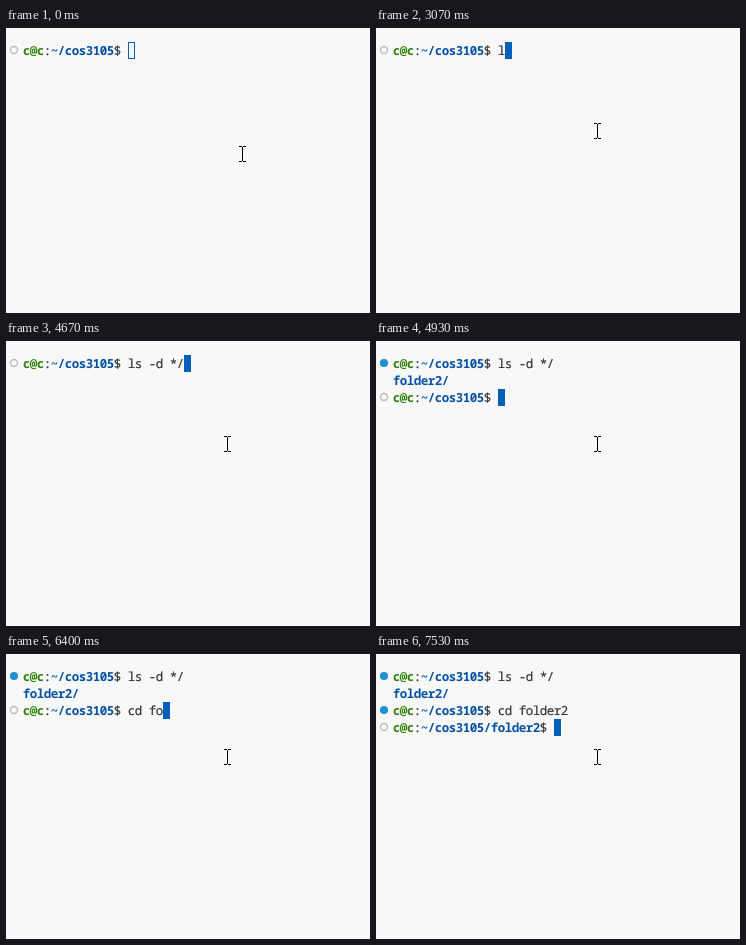
Recreate the animation shown at these times as an HTML page. Size 364x285 px, loop 8000 ms.

```html
<!DOCTYPE html>
<html lang="en">
<head>
<meta charset="utf-8">
<title>Terminal</title>
<style>
  html, body { margin: 0; width: 100%; height: 100%; overflow: hidden; background: #f8f8f8; }
  svg { display: block; width: 364px; height: 285px; }
  text {
    font: 12.5px "Noto Sans Mono", "DejaVu Sans Mono", monospace;
    fill: #333; stroke: #333; stroke-width: .2;
    text-anchor: middle; text-rendering: geometricPrecision; white-space: pre;
  }
  .user, .path { font-weight: 600; stroke: none; }
  .user { fill: #2f800a; }
  .path { fill: #0451a5; }
  .done { fill: #2090d3; }
  .open { fill: none; stroke: #bdbdbd; stroke-width: 1.4; }
</style>
</head>
<body>
<svg viewBox="0 0 364 285">
  <g id="screen"></g>
  <rect id="caret" stroke="#005fb8"/>
  <path id="beam" fill="none" stroke="#000" shape-rendering="crispEdges"
        d="M0 .5h3m1 0h3M3.5 1v14M0 15.5h3m1 0h3"/>
</svg>
<script>
const LOOP = 8000, LEFT = 17, TOP = 14, CELL = 7, ROW = 17;
const RUN_LS = 4870, LS_DONE = 4930, RUN_CD = 7530, FOCUS = 130;

const ls = { text: 'ls -d */', at: [3070, 3200, 3330, 3600, 3730, 3930, 4330, 4670] };
const cd = { text: 'cd folder2', at: [5730, 5930, 6130, 6330, 6400, 6670, 6730, 7000, 7070, 7330] };

// time, x, y
const pointer = [
  [0, 233, 118], [70, 229, 113], [130, 222, 103], [200, 218, 98],
  [400, 218, 97], [470, 218, 96], [530, 218, 95]
];

const screen = document.getElementById('screen');
const caret = document.getElementById('caret');
const beam = document.getElementById('beam');

const typed = (cmd, t) => cmd.text.slice(0, cmd.at.filter(at => at <= t).length);

// Centres each character in its terminal cell.
function put(text, col, row, cls = '') {
  const xs = [...text].map((_, i) => LEFT + CELL * (col + i + .5)).join(' ');
  return `<text class="${cls}" x="${xs}" y="${TOP + ROW * row + 13}">${text}</text>`;
}

function prompt(path, cmd, row, done) {
  const end = 4 + path.length;
  const dot = `<circle class="${done ? 'done' : 'open'}" cx="8" cy="${TOP + ROW * row + 8}" r="${done ? 4.1 : 3.5}"/>`;
  const svg = dot + put('c@c', 0, row, 'user') + put(':', 3, row) +
    put(path, 4, row, 'path') + put('$', end, row) + (cmd ? put(cmd, end + 2, row) : '');
  return { svg, col: end + 2 + cmd.length, row };
}

function content(t) {
  const home = '~/cos3105';
  const first = prompt(home, typed(ls, t), 0, t >= LS_DONE);
  if (t < RUN_LS) return first;
  if (t < LS_DONE) return { svg: first.svg, col: 0, row: 1 };

  const listing = first.svg + put('folder2/', 0, 1, 'path');
  const second = prompt(home, typed(cd, t), 2, t >= RUN_CD);
  if (t < RUN_CD) return { ...second, svg: listing + second.svg };

  const third = prompt(home + '/folder2', '', 3, false);
  return { ...third, svg: listing + second.svg + third.svg };
}

let shown = '';
function draw(t) {
  const { svg, col, row } = content(t);
  if (svg !== shown) screen.innerHTML = shown = svg;

  const box = {
    x: LEFT + CELL * col + .5, y: TOP + ROW * row + .5, width: CELL - 1, height: ROW - 1,
    fill: t < FOCUS ? 'none' : '#005fb8'
  };
  for (const key in box) caret.setAttribute(key, box[key]);

  const [, x, y] = pointer.filter(p => p[0] <= t).pop();
  beam.setAttribute('transform', `translate(${x} ${y})`);
}

const start = performance.now();
function tick() {
  draw((performance.now() - start) % LOOP);
  requestAnimationFrame(tick);
}
draw(0);
requestAnimationFrame(tick);
</script>
</body>
</html>
```
